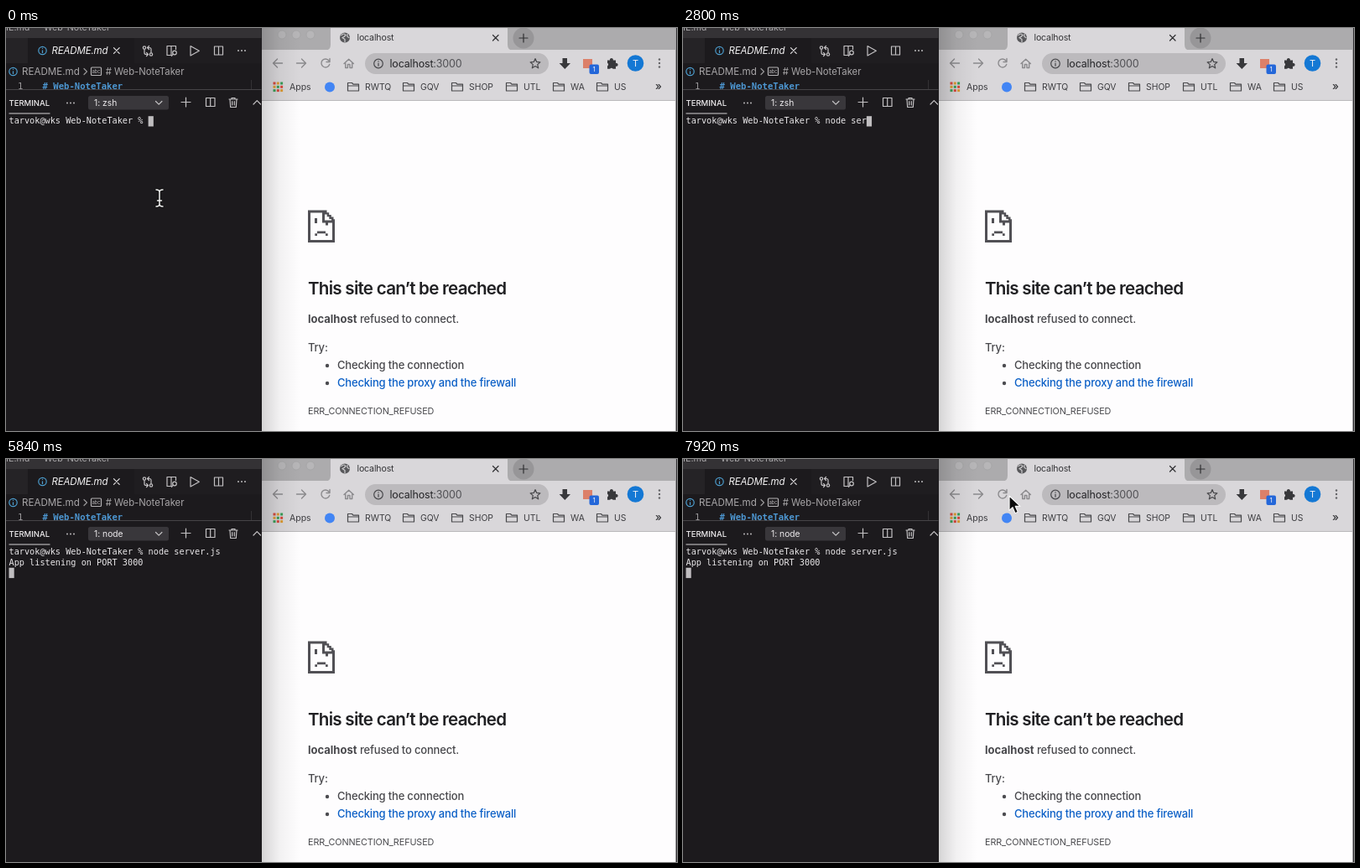
Animation of 800 by 481 pixels, one loop 8000 ms. Source, as an HTML page:

```html
<!DOCTYPE html>
<html lang="en">
<head>
<meta charset="utf-8">
<title>Starting a local server</title>
<style>
  html, body { margin: 0; width: 100%; height: 100%; overflow: hidden; background: #1c1a1d; }
  svg { display: block; width: 100vw; height: 100vh; }
  text { font-family: Inter, "Open Sans", sans-serif; white-space: pre; font-optical-sizing: none; }
  .mono { font-family: "DejaVu Sans Mono", "Liberation Mono", monospace; }
  .term { font-size: 10.22px; fill: #eae8ea; }
  .line { fill: none; stroke-width: 1.2; stroke-linecap: round; stroke-linejoin: round; }
  .ide { stroke: #c3c1c3; }
  .nav { stroke: #8b8a8d; stroke-width: 1.4; }
  .dark { stroke: #48484b; }
  .mark { font-size: 10.4px; fill: #3d3d40; }
  .body { font-size: 13px; font-weight: 450; letter-spacing: -.014em; fill: #48484c; }
  .rim { stroke: #111; stroke-width: 3.2; }
  .core { stroke: #f4f4f4; stroke-width: 1.5; }
  .outlined .rim { stroke: #f4f4f4; stroke-width: 4; }
  .outlined .core { stroke: #222; }
</style>
</head>
<body>
<svg viewBox="0 0 800 481" preserveAspectRatio="none">
  <defs>
    <linearGradient id="shade">
      <stop offset="0" stop-opacity=".16"/>
      <stop offset=".45" stop-opacity=".05"/>
      <stop offset="1" stop-opacity="0"/>
    </linearGradient>
    <clipPath id="editor"><rect width="305" height="73"/></clipPath>
    <clipPath id="ideClip"><rect width="304.5" height="481"/></clipPath>
    <path id="beamShape" d="M-4-10q4 0 4 3V7q0 3-4 3M4-10q-4 0-4 3V7q0 3 4 3M-2.5 3h5"/>
  </defs>

  <!-- browser window -->
  <rect x="305" width="495" height="481" fill="#fefdfe"/>
  <rect x="305" width="495" height="27" fill="#acabad"/>
  <path d="M380 27q7 0 7-7V0h211v20q0 7 7 7z" fill="#d9d7da"/>
  <rect x="305" y="26" width="495" height="60" fill="#d9d7da"/>
  <path d="M305 86.5h495" stroke="#bab9bb"/>
  <g fill="#b7b6b8" stroke="#a3a2a4" stroke-width=".7">
    <circle cx="329" cy="8" r="5"/><circle cx="346" cy="8" r="5"/><circle cx="363" cy="8" r="5"/>
  </g>
  <circle cx="404" cy="11.5" r="6" fill="#58585b"/>
  <path d="M400 8.5q3-3 5 0l-2 2-2 1 3 2v3M407 7.5q-1 3 2 4" class="line" stroke="#cfced0"/>
  <text x="418.5" y="15.3" font-size="10.6" letter-spacing="-.15" fill="#333336">localhost</text>
  <path d="M580.5 8.5l6.5 6.5m0-6.5l-6.5 6.5" class="line" stroke="#2f2f32" stroke-width="1.5"/>
  <circle cx="617" cy="12" r="12.5" fill="#979698"/>
  <path d="M612 12h10M617 7v10" class="line" stroke="#303033" stroke-width="1.5"/>

  <path class="line nav" d="M329.5 42h-11m5-5l-5 5 5 5M346.5 42h11m-5-5l5 5-5 5"/>
  <path class="line nav" d="M385 39a5 5 0 1 0 .7 4.5M386 36.5v4h-4"/>
  <path class="line nav" d="M403 42.5l5.7-5.3 5.7 5.3M404.7 42v5.5h2.7v-4h2.6v4h2.7V42"/>
  <rect x="428" y="30" width="219" height="25" rx="12.5" fill="#bcbabd"/>
  <circle cx="444" cy="42.5" r="5.3" class="line dark"/>
  <path d="M444 42v3.2M444 39.7v.2" class="line dark"/>
  <text x="457.5" y="46.7" font-size="12.5" letter-spacing="-.18" fill="#252528">localhost<tspan fill="#505054">:3000</tspan></text>
  <path d="M631 36.5l1.7 3.9 4.2.4-3.2 2.8 1 4.2-3.7-2.2-3.7 2.2 1-4.2-3.2-2.8 4.2-.4z" class="line dark"/>
  <path d="M663.5 36h5.5v6h4l-6.7 7-6.7-7h3.9z" fill="#38383b"/>
  <rect x="688" y="37" width="11" height="11" fill="#dc8069"/>
  <rect x="695.5" y="43.5" width="11.5" height="11.5" rx="2" fill="#2467d9"/>
  <text x="701.2" y="52.4" font-size="8" text-anchor="middle" fill="#f3f3f6">1</text>
  <path d="M717 38.5h3a2 2 0 1 1 3.8 0h3.2v3.4a2 2 0 1 1 0 3.8v3h-3.4a2 2 0 0 0-3.5 0H717v-3.3a2 2 0 0 0 0-3.6z" fill="#38383b"/>
  <circle cx="750.5" cy="42" r="9.8" fill="#1478d4"/>
  <text x="750.5" y="46" font-size="11" text-anchor="middle" fill="#eeeef3">T</text>
  <g fill="#646467"><circle cx="779" cy="37.5" r="1.2"/><circle cx="779" cy="42" r="1.2"/><circle cx="779" cy="46.5" r="1.2"/></g>

  <g id="apps"></g>
  <text class="mark" x="338" y="74" style="font-size:10.5px">Apps</text>
  <circle cx="386" cy="70.5" r="6" fill="#4285f4"/>
  <g id="bookmarks"></g>
  <text x="774" y="74" font-size="13" font-weight="500" fill="#353538">»</text>

  <!-- error page -->
  <path fill="#515055" d="M360 217.5h22.5v2.7h2.7v2.7h2.6v2.7h2.7v2.7H392V256h-32zm3 3V253h26v-20.5h-12v-12zm17 0v9h8v-1.5h-2.7v-2.7h-2.6v-2.7H380z"/>
  <path fill="#515055" d="M368 227h3v6h-3zM381 232h3v3.5h-3zM371 242.5h10v2.7h-10zM368.3 245.2h2.7v2.7h-2.7zM381 245.2h2.7v2.7H381z"/>
  <text x="360" y="317.7" font-size="20.6" font-weight="600" letter-spacing="-.75" fill="#202023">This site can’t be reached</text>
  <text class="body" x="360" y="352"><tspan font-weight="700" letter-spacing="0">localhost</tspan></text>
  <text class="body" x="422" y="352">refused to connect.</text>
  <text class="body" x="360" y="386">Try:</text>
  <circle cx="383" cy="403" r="2.2" fill="#4c4c50"/>
  <circle cx="383" cy="424" r="2.2" fill="#4c4c50"/>
  <text class="body" x="395" y="407.3">Checking the connection</text>
  <text class="body" x="395" y="428.3" style="fill:#0b5fc6">Checking the proxy and the firewall</text>
  <text x="360" y="461" font-size="10.8" letter-spacing="-.09" fill="#48484c">ERR_CONNECTION_REFUSED</text>
  <rect x="305" width="46" height="481" fill="url(#shade)"/>
  <path d="M798.5 0v481" stroke="#a5a4a6"/>
  <path d="M799.5 0v481" stroke="#343336"/>

  <!-- code editor -->
  <g clip-path="url(#ideClip)">
    <rect width="305" height="481" fill="#1c1a1d"/>
    <rect width="305" height="12" fill="#343235"/>
    <rect y="12" width="305" height="30" fill="#252326"/>
    <rect x="26" y="12" width="127" height="30" fill="#1c1a1d"/>
    <rect x="153" y="12" width="152" height="30" fill="#1f1d20"/>
    <text x="124" y="3.3" font-size="10.7" text-anchor="end" fill="#adabad">ME.md — Web-NoteTaker</text>
    <g class="line" stroke="#4d9fd0">
      <circle cx="43.5" cy="27" r="4.7"/><path d="M43.5 26.8v2.7M43.5 24.4v.1"/>
      <circle cx="8.5" cy="52" r="4.7"/><path d="M8.5 51.8v2.7M8.5 49.4v.1"/>
    </g>
    <text x="54.5" y="31" font-size="11.5" font-style="italic" letter-spacing="-.15" fill="#f5f4f5">README.md</text>
    <path d="M128.5 23.7l6.7 6.7m0-6.7l-6.7 6.7" class="line" stroke="#e4e2e4"/>
    <g class="line ide">
      <circle cx="165" cy="23.5" r="1.7"/><circle cx="173" cy="31.5" r="1.7"/>
      <path d="M165 25.5v4q0 2 2 2h2.5m-2-2l2 2-2 2M173 29.5v-4q0-2-2-2h-2.5m2-2l-2 2 2 2"/>
      <path d="M196 32.5h-4v-11h10.5v4M197 21.5v11"/><circle cx="201" cy="29.5" r="2.3"/><path d="M199.4 31.2l-2 2.2"/>
      <path d="M220 21.5l10.3 5.7-10.3 5.7z"/>
      <path d="M248.5 22h10v10h-10zM253.5 22v10"/>
    </g>
    <g id="dots" fill="#cac8ca"></g>
    <text x="19" y="56" font-size="11.6" fill="#a9a7a9">README.md</text>
    <path d="M93 48.5l3.5 3.5-3.5 3.5" class="line" stroke="#989698"/>
    <rect x="101.5" y="47" width="12" height="9.5" rx="1" class="line" stroke="#b4b2b4"/>
    <text x="107.5" y="53.8" font-size="5.5" text-anchor="middle" fill="#c0bec0">abc</text>
    <text x="118.7" y="56" font-size="11.3" fill="#a9a7a9">#&#160;Web-NoteTaker</text>
    <g clip-path="url(#editor)">
      <text class="mono" x="14" y="73" font-size="10.5" fill="#9a989a">1</text>
      <text class="mono" x="43.5" y="73" font-size="10.6" font-weight="700" fill="#4d97d2">#&#160;Web-NoteTaker</text>
      <path d="M292.5 62v11" stroke="#343235"/>
    </g>
    <path d="M0 73.5h305" stroke="#464447"/>
    <text x="3.5" y="93" font-size="9.5" font-weight="450" fill="#efedef">TERMINAL</text>
    <path d="M3.5 102h49" stroke="#d4d2d4"/>
    <rect x="98" y="81" width="96" height="16.5" rx="2.5" fill="#39373b"/>
    <text id="shell" x="105" y="93" font-size="10.3" fill="#eeecee"></text>
    <g class="line ide">
      <path d="M178.5 87.5l3.7 3.7 3.7-3.7M209 88.5h11M214.5 83v11"/>
      <path d="M238.5 83.5h10.5v10h-10.5zM243.7 83.5v10"/>
      <path d="M266 85h10M269 85v-1.5h4V85M267 85l.7 9.5h6.6l.7-9.5M269.7 87.5v4.5M272.3 87.5v4.5"/>
      <path d="M295 91l4.3-4.3 4.3 4.3"/>
    </g>
    <text id="command" class="mono term" x="3.5" y="114.3"></text>
    <text id="output" class="mono term" x="3.5" y="126.6">App listening on PORT 3000</text>
    <rect id="caret" width="6.2" height="12.3" fill="#c0bec0"/>
  </g>

  <g id="beam" fill="none" stroke-linecap="round">
    <use href="#beamShape" class="rim"/>
    <use href="#beamShape" class="core"/>
  </g>
  <path id="arrow" d="M0 0v17.5l4-3.8 3 7 3.3-1.4-3-6.9h5.7z" fill="#0b0b0c" stroke="#f5f5f5" stroke-width="1.2" stroke-linejoin="round"/>
</svg>
<script>
  const LOOP = 8000, STEP = 80, CELL = 6.153;
  const PROMPT = "tarvok@wks Web-NoteTaker % ", COMMAND = "node server.js";
  const KEYS = [1120, 1280, 1440, 1600, 2080, 2320, 2480, 2640, 3040, 3360, 3760, 4240, 4880, 5120];
  const ENTER = 5440;
  // pointer path: time, x, y
  const PATH = [
    [0, 183, 203], [320, 183, 203], [960, 203, 112], [6400, 203, 112],
    [7040, 397, 56], [7360, 389, 44], [LOOP, 389, 44]
  ];
  const el = id => document.getElementById(id);

  const colors = ["#d6493d", "#dc9a35", "#3a9d58"];
  let grid = "";
  for (let i = 0; i < 9; i++) {
    const col = i % 3, row = Math.floor(i / 3);
    grid += `<rect x="${318.5 + col * 4.3}" y="${64.5 + row * 4.3}" width="3" height="3" fill="${colors[(col + row) % 3]}"/>`;
  }
  el("apps").innerHTML = grid;

  const marks = [[407, "RWTQ"], [473, "GQV"], [531, "SHOP"], [596, "UTL"], [652, "WA"], [704, "US"]];
  el("bookmarks").innerHTML = marks.map(([x, name]) =>
    `<path class="line dark" d="M${x + .5} 75v-9.5h5l1.5 1.7h6.5V75zM${x + .5} 69h13"/>
     <text class="mark" x="${x + 21}" y="74">${name}</text>`).join("");

  el("dots").innerHTML = [[77, 89.5], [281, 27]].map(([x, y]) =>
    [-4, 0, 4].map(d => `<circle cx="${x + d}" cy="${y}" r=".9"/>`).join("")).join("");

  const ease = u => u * u * (3 - 2 * u);

  function pointerAt(t) {
    const i = PATH.findIndex(p => p[0] > t);
    const [t0, x0, y0] = PATH[i - 1], [t1, x1, y1] = PATH[i];
    const k = ease((t - t0) / (t1 - t0));
    return [x0 + (x1 - x0) * k, y0 + (y1 - y0) * k];
  }

  function show(id, on) { el(id).style.display = on ? "" : "none"; }

  function draw(time) {
    const t = Math.floor(time % LOOP / STEP) * STEP;
    const line = PROMPT + COMMAND.slice(0, KEYS.filter(k => k <= t).length);
    const running = t >= ENTER;
    el("command").textContent = line;
    el("shell").textContent = running ? "1: node" : "1: zsh";
    show("output", running);
    el("caret").setAttribute("x", 3.5 + (running ? 0 : line.length * CELL));
    el("caret").setAttribute("y", running ? 129.8 : 105.2);

    const [x, y] = pointerAt(t);
    const hidden = t >= 1760 && t < 6400;
    for (const id of ["beam", "arrow"]) {
      show(id, !hidden && (id === "beam") === (x < 305));
      el(id).setAttribute("transform", `translate(${x} ${y})`);
    }
    // dark beam with a light rim while it rests on the command line
    el("beam").classList.toggle("outlined", y < 118);
  }

  const start = performance.now();
  function tick() {
    draw(performance.now() - start);
    requestAnimationFrame(tick);
  }
  tick();
</script>
</body>
</html>
```
